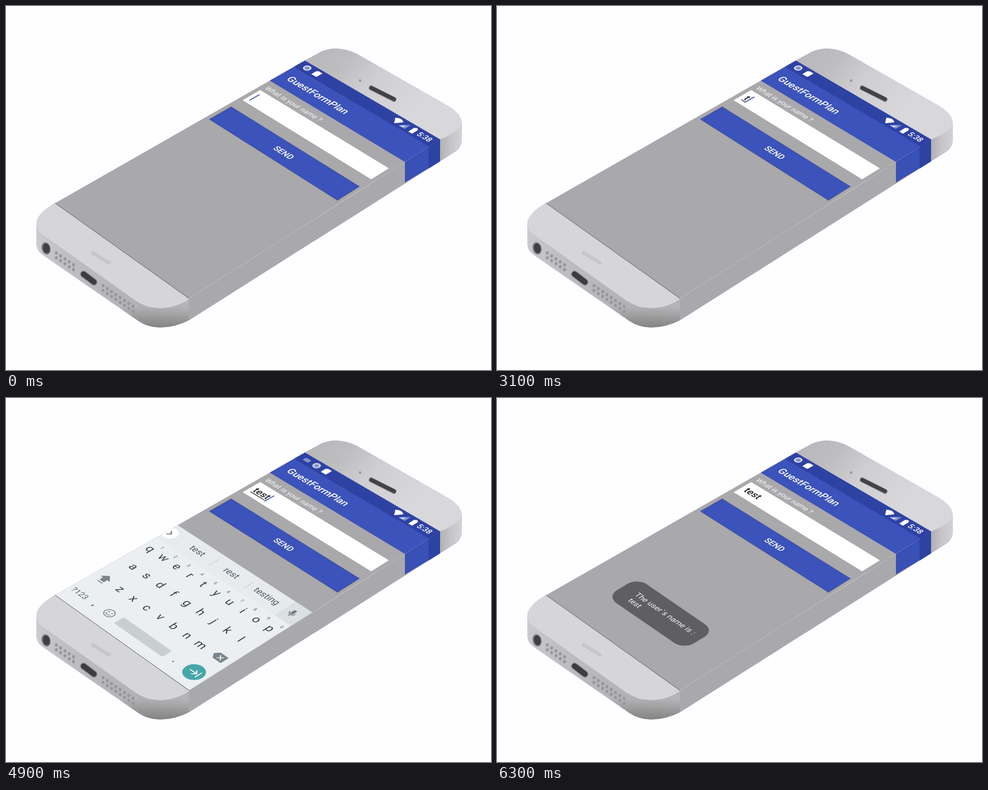
An HTML page for the animation above (6700 ms loop, 800 px wide and 600 px high).

```html
<!DOCTYPE html>
<html lang="en">
<head>
<meta charset="utf-8">
<title>Phone form</title>
<style>
html, body { margin: 0; width: 100%; height: 100%; overflow: hidden; background: #fefdff; }
svg { display: block; width: 800px; height: 600px; font-family: Roboto, sans-serif; }
</style>
</head>
<body>
<svg id="stage" viewBox="0 0 800 600"></svg>
<script>
const LOOP = 6700, W = 320, H = 569;
const BAR = '#3b53ba', STATUS = '#2e42a4', INK = '#364147', ICON = '#78848b';
const MEDIUM = 'font-weight="500"';

// Screen units (320 x 569) to stage pixels on the tilted face.
function place(x, y) {
  const u = x / W, v = y / H;
  return [493 + 223 * u - 412 * v - 2 * u * v, 90 + 130 * u + 235 * v + 27 * u * v];
}

// Group whose own axes follow the face around (x, y).
function put(x, y, inner) {
  const u = x / W, v = y / H;
  const m = [(223 - 2 * v) / W, (130 + 27 * v) / W, (-412 - 2 * u) / H, (235 + 27 * u) / H, ...place(x, y)];
  return `<g transform="matrix(${m.map(n => n.toFixed(4))})">${inner}</g>`;
}

function quad(x1, y1, x2, y2, fill, more = '') {
  const pts = [[x1, y1], [x2, y1], [x2, y2], [x1, y2]].map(p => place(...p).map(n => n.toFixed(2)));
  return `<polygon points="${pts.join(' ')}" fill="${fill}" ${more}/>`;
}

const text = (x, y, str, size, fill, more = '') =>
  put(x, y, `<text font-size="${size}" fill="${fill}" ${more}>${str}</text>`);
const mid = (x, y, str, size, fill, more = '') => text(x, y, str, size, fill, 'text-anchor="middle" ' + more);
const path = (d, fill, more = '') => `<path d="${d}" fill="${fill}" ${more}/>`;
const stroke = (d, color, width, more = '') =>
  path(d, 'none', `stroke="${color}" stroke-width="${width}" stroke-linecap="round" ${more}`);

function fade(id, x1, y1, x2, y2, ...stops) {
  return `<linearGradient id="${id}" gradientUnits="userSpaceOnUse" x1="${x1}" y1="${y1}" x2="${x2}" y2="${y2}">` +
    stops.map(([o, c]) => `<stop offset="${o}" stop-color="${c}"/>`).join('') + '</linearGradient>';
}

function dots(x, y, cols) {
  let out = '';
  for (let i = 0; i < cols; i++)
    for (let j = 0; j < 2; j++)
      out += `<ellipse cx="${x + i * 7.1}" cy="${y + i * 4.9 + j * 8}" rx="2.5" ry="2.8" fill="#98979a"/>`;
  return out;
}

function body() {
  const base = 'M81 325Q50 341 50 362V392Q50 403 60 410L218 519Q234 530 254 530Q279 530 302 518V482Z';
  return path('M493 90L520 75Q547 64 577 78L728 164Q752 178 752 194V224Q750 235 740 241L716 256Z', 'url(#topSide)') +
    path('M493 90L520 75Q547 64 577 78L728 164Q752 178 751 195Q749 206 716 220Z', 'url(#topFace)') +
    path(base, 'url(#lowSide)') + path(base, 'url(#lowShade)') +
    path('M81 325Q50 342 50 359Q50 370 61 377L214 486Q232 498 254 498Q280 498 302 483Z', '#d6d5d7') +
    path('M302 482L716 220V256L302 518Z', '#a9a8aa') +
    stroke('M602.500 135L640 154', '#7b7a7d', 8) + stroke('M602.500 135L640 153.500', '#424144', 6) +
    '<circle cx="584" cy="123" r="2.2" fill="#9a999d"/>' +
    stroke('M143 407L170 423.500', '#c7c6c8', 6) +
    '<ellipse cx="66" cy="399.500" rx="7.500" ry="10.500" fill="#89888b" transform="rotate(-14 66 399.500)"/>' +
    '<ellipse cx="66.500" cy="399.500" rx="5.800" ry="8.500" fill="#414043" transform="rotate(-14 66 399.500)"/>' +
    dots(83, 407, 5) + dots(160, 461, 8) +
    stroke('M128 442L145 455', '#8d8c8f', 11.5) + stroke('M128 442L145 455', '#3d3c3f', 9);
}

function statusBar() {
  const ring = put(18, 12, '<circle r="7" fill="#e8eaf4"/><circle r="4.600" fill="#8193c9"/>');
  const card = put(41, 12, path('M-3 -7H6V7H-6V-4Z', '#fff'));
  const ime = put(18, 12, '<g class="ime"><rect x="-6" y="-3.500" width="12" height="8" rx="1" fill="#9aa5d4"/>' +
    stroke('M-4 -1H4M-4 2H4', STATUS, 1, 'stroke-dasharray="1 2"') + '</g>');
  return ime + `<g class="tray">${ring}${card}</g>` +
    put(232, 12, path('M0 8L-9.500 -4Q0 -11 9.500 -4Z', '#fff')) +
    put(249, 12, path('M7 -7V7H-7Z', '#8493d3') + path('M2 -2V7H-7Z', '#c3caea')) +
    put(270, 12, path('M-4.500 -6H-2V-8H2V-6H4.500V8H-4.500Z', '#fff')) +
    mid(296, 17.5, '5:38', 15.5, '#fff', MEDIUM);
}

function form() {
  const letters = [...'test'].map((c, i) => `<tspan class="c${i}">${c}</tspan>`).join('');
  const entry = `<text font-size="19.500" fill="#232326" ${MEDIUM}>${letters}</text>` +
    '<rect class="under" y="2.500" width="1" height="1.600" fill="#232326"/>' +
    '<g class="pos"><rect class="caret" x="-.700" y="-17" width="2" height="22.500" fill="#3247a6"/></g>';
  return text(9.5, 102, 'What is your name ?', 14.5, '#f8f7f9') +
    quad(8, 109.5, 313, 149.5, '#fff') + put(16, 136, entry) +
    quad(7, 178, 313.5, 228.5, '#77767c', 'class="press"') +
    quad(8, 175.5, 312.5, 225.5, BAR, 'stroke="#000" stroke-opacity=".18"') +
    mid(158.5, 206, 'SEND', 16.5, '#fff', MEDIUM);
}

function keyboard() {
  const row = (keys, x, y, pitch) =>
    [...keys].map((k, i) => mid(x + i * pitch, y + 6.5, k, 23, INK)).join('');
  const digits = [...'1234567890'].map((d, i) => mid(27 + i * 31.6, 354, d, 9.5, '#5e696f')).join('');
  const words = [['test', 72], ['rest', 153], ['testing', 237]]
    .map(([w, x]) => mid(x, 319.5, w, 18, '#4f5a60')).join('');
  const split = x => quad(x, 303, x + 1, 326, '#b9c1c5');
  return quad(0, 290, W, H + 30, '#ebeff1') + quad(0, 290, W, 338, '#e7ebed') +
    quad(281, 290, W, 338, '#dbe0e3') +
    split(112) + split(195) + `<g class="words">${words}</g>` +
    put(7, 314, '<circle r="14.500" fill="#fff"/>' + stroke('M-2 -5L3 0L-2 5', '#555f65', 2)) +
    put(298, 314, '<rect x="-3" y="-9" width="6" height="12" rx="3" fill="#707b82"/>' +
      stroke('M-6 -1A6 6 0 0 0 6 -1M0 5V9', '#707b82', 1.7)) +
    row('qwertyuiop', 15.5, 368, 31.6) + digits +
    row('asdfghjkl', 31, 421, 32) + row('zxcvbnm', 59, 478, 32) +
    put(23, 478, path('M0 -12L11 -1H5V7H-5V-1H-11Z', ICON) + stroke('M-5 11H5', ICON, 2)) +
    put(295, 476, path('M-14 0L-7 -9H12V9H-7Z', ICON) + stroke('M-2 -4L6 4M6 -4L-2 4', '#ebeff1', 2)) +
    mid(23, 540, '?123', 16, '#59646a') + mid(59, 540, ',', 21, INK) +
    put(92, 533, `<circle r="9.500" fill="none" stroke="${ICON}" stroke-width="1.700"/>` +
      `<circle cx="-3.500" cy="-2.500" r="1.500" fill="${ICON}"/><circle cx="3.500" cy="-2.500" r="1.500" fill="${ICON}"/>` +
      stroke('M-5 2.500Q0 8 5 2.500', ICON, 1.6)) +
    put(173, 533.5, '<rect x="-58" y="-11" width="115" height="22" rx="3" fill="#c9ced1"/>') +
    mid(250, 540, '.', 23, INK) +
    put(293, 532, '<circle r="19.500" fill="#46a6a9"/>' +
      stroke('M-9 0H5M0 -6L6 0L0 6M10 -7V7', '#fff', 2));
}

function toast() {
  return put(159, 460, '<rect x="-92" y="-35" width="184" height="70" rx="23" fill="#5f5e60"/>') +
    text(95, 459.5, 'The user`s name is :', 15.5, '#f3f2f4') + text(98, 478, 'test', 15.5, '#f3f2f4');
}

const defs = '<defs>' +
  fade('topFace', 520, 70, 660, 185, [0, '#b9b8ba'], [.25, '#bebdbf'], [.55, '#cfced0'], [1, '#d8d7d9']) +
  fade('topSide', 716, 0, 752, 0, [0, '#b1b0b3'], [.5, '#c6c5c8'], [1, '#d2d1d3']) +
  fade('lowSide', 50, 0, 302, 0, [0, '#cbcacc'], [.2, '#bfbec0'], [.7, '#b1b0b2'], [1, '#b5b4b6']) +
  fade('lowShade', 245, 496, 245, 530, [0, '#0000'], [1, '#0004']) +
  fade('edge', 302, 482, 650, 262, [0, '#bbbabd'], [.45, '#b4b3b6'], [.8, '#c9c8cb'], [1, '#b0afb2']) +
  `<clipPath id="face">${quad(0, 0, W, H, '#000')}</clipPath></defs>`;

document.getElementById('stage').innerHTML = defs + body() +
  quad(0, 0, W, H, '#a9a8aa') +
  stroke('M302 482L658 257', 'url(#edge)', 1) +
  path('M658 257L716 220V256L658 291Z', '#3950b5') + path('M697 232L716 220V256L697 268Z', STATUS) +
  quad(0, 0, W, 80, BAR) + quad(0, 0, W, 25, STATUS) +
  statusBar() +
  text(16, 59, 'GuestFormPlan', 20, '#fff', MEDIUM) +
  form() +
  `<g clip-path="url(#face)"><g class="keys">${keyboard()}</g></g>` +
  `<g class="toast">${toast()}</g>` +
  stroke('M81 325L302 482', '#6c6b6e', 1);

// Held states: [start in ms, value] pairs become stepped keyframes.
let css = '';
const used = {};
function hold(name, prop, states) {
  const steps = states.map(([ms, v]) => `${Math.floor(ms / LOOP * 1e5) / 1e3}%{${prop}:${v}}`);
  css += `@keyframes ${name}-${prop}{${steps.join('')}}`;
  (used[name] ||= []).push(`${name}-${prop} ${LOOP}ms step-end infinite`);
}

const during = (name, from, to) =>
  hold(name, 'opacity', [[0, 0], [from, 1], ...(to ? [[to, 0]] : [])]);
const typed = [3100, 3300, 3500, 3700];
const stops = [9, 18, 28, 35];

typed.forEach((ms, i) => hold('c' + i, 'visibility', [[0, 'hidden'], [ms, 'visible']]));
hold('pos', 'transform', [[0, 'translate(0)'], ...typed.map((ms, i) => [ms, `translate(${stops[i]}px)`])]);
hold('under', 'transform', [[0, 'scale(0,1)'], ...typed.map((ms, i) => [ms, `scale(${stops[i] - 1},1)`]), [5400, 'scale(0,1)']]);
hold('caret', 'opacity', [0, 100, 600, 1100, 1600, 2100, 2700, 4300, 4800, 5900].map((ms, i) => [ms, (i + 1) % 2]));
during('ime', 3800, 5400);
hold('tray', 'transform', [[0, 'translate(0)'], [3800, 'translate(15.5px,9.2px)'], [5400, 'translate(0)']]);
during('words', 3700);
during('press', 5100, 5700);
hold('keys', 'opacity', [[0, 0], [3200, .3], [3300, .8], [3400, 1], [5400, .88], [5500, .2], [5600, 0]]);
hold('keys', 'transform', [
  [0, 'translate(-27px,15px)'], [3300, 'translate(-9px,5px)'], [3400, 'translate(-2px,1px)'],
  [3500, 'translate(0)'], [5400, 'translate(-2.5px,1.5px)'], [5500, 'translate(-27px,15.5px)']
]);
hold('toast', 'opacity', [[0, 0], [5500, .5], [5600, .85], [5700, 1]]);

for (const name in used) css += `.${name}{animation:${used[name].join(',')}}`;
const sheet = document.createElement('style');
sheet.textContent = css;
document.head.append(sheet);
</script>
</body>
</html>
```
